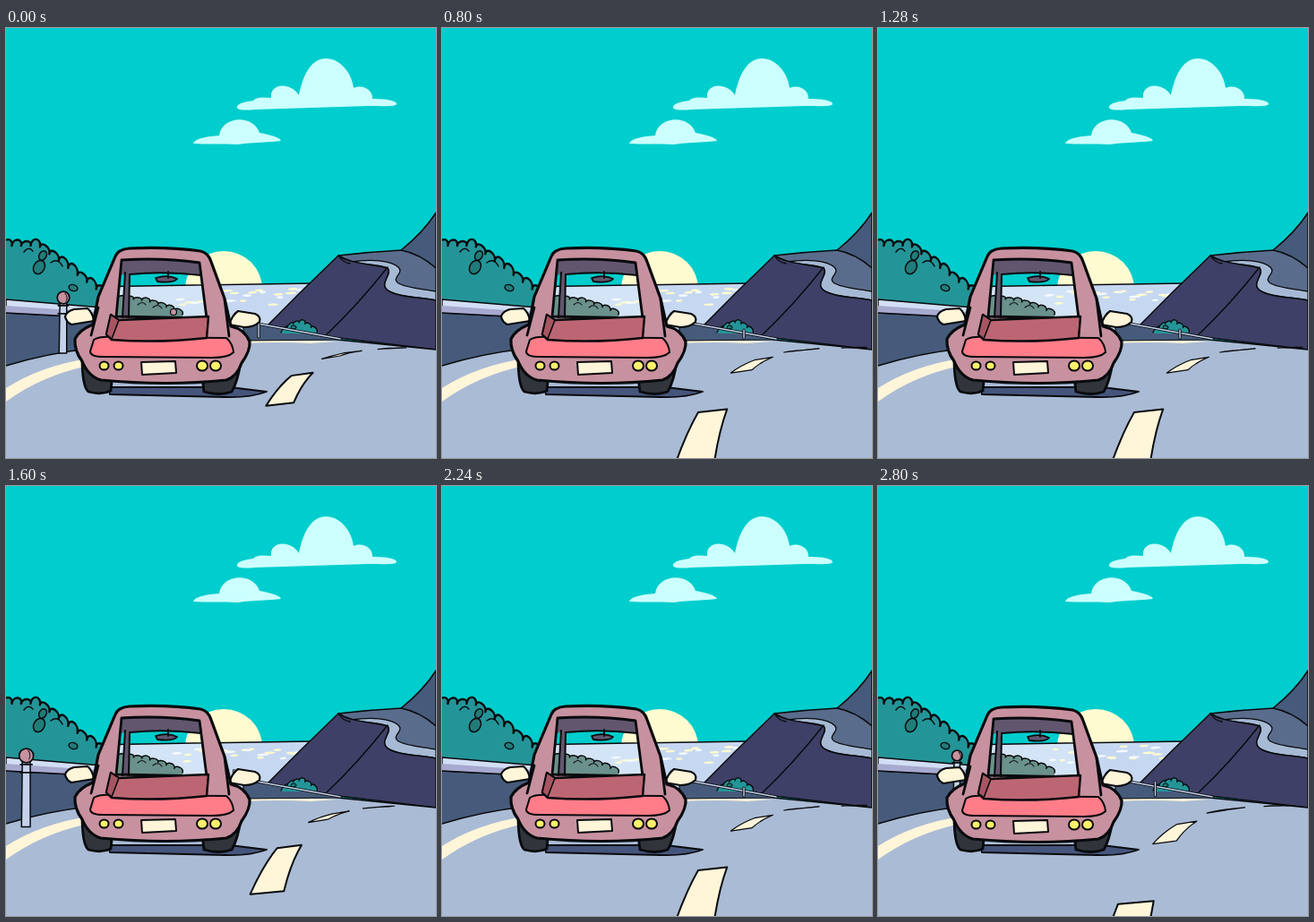
Animation of 480x480 px, one loop 2880 ms. Source, as an HTML page with a canvas:

```html
<!DOCTYPE html>
<html lang="en">
<head>
<meta charset="utf-8">
<title>Coast drive</title>
<style>
html, body { margin: 0; width: 100%; height: 100%; overflow: hidden; background: #00cdcd; }
canvas { display: block; width: 480px; height: 480px; }
</style>
</head>
<body>
<canvas id="stage" width="480" height="480"></canvas>
<script>
const ctx = document.getElementById('stage').getContext('2d');
const LOOP = 2880;
const SCENERY_STEP = 120;
const CAR_STEP = 80;

const INK = '#080a0d', CREAM = '#fff5d9', SUN = '#fffbd0', SEA = '#c6d8f1', GLASS_SEA = '#d3e4f6';
const ROAD = '#aabbd5', SLOPE = '#465b7b', ROCK = '#5a6c8b', DARK_ROCK = '#3f4067';
const LEAF = '#239598', DARK_LEAF = '#217c79', RAIL = '#c5d2eb', PINK = '#c8919f', TINT = '#62566f';

function shape(d, fill, width = 0, ink = INK) {
  const path = new Path2D(d);
  if (fill) {
    ctx.fillStyle = fill;
    ctx.fill(path);
  }
  if (width) {
    ctx.strokeStyle = ink;
    ctx.lineWidth = width;
    ctx.stroke(path);
  }
}

function oval(x, y, rx, ry, fill, width = 0, tilt = 0) {
  ctx.beginPath();
  ctx.ellipse(x, y, rx, ry, tilt, 0, Math.PI * 2);
  ctx.fillStyle = fill;
  ctx.fill();
  if (width) {
    ctx.strokeStyle = INK;
    ctx.lineWidth = width;
    ctx.stroke();
  }
}

function random(seed) {
  const v = Math.sin(seed * 127.1 + 11.7) * 43758.5453;
  return v - Math.floor(v);
}

// Row of leafy bumps whose valleys follow top(x).
function foliage(x0, x1, bumps, top, lift, base, fill, width) {
  const step = (x1 - x0) / bumps;
  let d = `M${x0} ${top(x0)}`;
  for (let i = 1; i <= bumps; i++) {
    const x = x0 + i * step, y = top(x), from = x - step;
    const rise = lift * (0.8 + 0.5 * random(i));
    d += `C${from + 1} ${top(from) - rise} ${x + 2} ${y - rise} ${x} ${y}`;
  }
  shape(`${d}V${base}H${x0}Z`, fill);
  shape(d, null, width);
}

function sky() {
  ctx.fillStyle = '#00cdcd';
  ctx.fillRect(0, 0, 480, 480);
  shape('M258 89C257 84 269 82 276 81C281 76 289 78 296 78C294 61 318 60 327 75' +
    'C331 54 340 34 357 34C373 34 386 50 388 67C400 62 410 71 409 79C420 79 436 80 436 85' +
    'C435 88 422 87 405 87L278 91C269 92 259 92 258 89Z', '#ccffff');
  shape('M209 129C211 123 225 121 238 120C241 98 276 96 283 117C294 119 306 122 307 126' +
    'C295 128 278 127 259 130C240 129 224 130 209 129Z', '#ccffff');
  oval(243, 291, 43, 42, SUN);
}

function sea(pattern, colour) {
  shape('M90 289L342 285L285 340H90Z', colour);
  shape('M90 289L342 285', null, 1.5);
  for (let i = 0; i < 22; i++) {
    const seed = pattern * 100 + i * 3;
    const x = 190 + (i + random(seed)) * 6.4;
    const y = 290 + 19 * random(seed + 1);
    oval(x, y, 3 + 4 * random(seed + 2), 1.3, i % 3 ? SUN : '#f4faff', 0, -0.04);
  }
}

function hills() {
  shape('M480 206Q466 228 441 248Q458 266 480 272Z', SLOPE, 1.5);
  shape('M371 254Q405 250 441 248Q462 252 480 268V320H425Z', ROCK, 1.5);
  shape('M385 261C407 258 429 259 438 267C445 274 429 279 438 285C450 291 464 291 480 294' +
    'V304C461 300 440 301 428 294C414 286 432 276 426 268C418 264 397 264 385 261Z', '#a6bad5', 1.3);
  shape('M371 254Q329 294 290 334L354 344L480 359V304C461 300 440 301 428 294' +
    'C414 286 432 276 426 268C407 263 387 264 371 254Z', DARK_ROCK, 1.5);
  shape('M371 254Q376 262 384 263M426 267Q392 310 357 343', null, 1.4);
}

function leftBank() {
  foliage(-4, 132, 13, x => 243 + 0.75 * Math.max(0, x - 36), 8, 314, LEAF, 2.4);
  shape('M20 250Q25 243 30 249M50 262Q58 256 63 266', null, 1.5);
  oval(41, 254, 4, 5.5, DARK_LEAF, 1.5, 0.5);
  oval(37, 267, 6, 8, DARK_LEAF, 1.5, 0.5);
  oval(75, 290, 5, 3.5, DARK_LEAF, 1.4, 0.3);

  shape('M0 317L130 323V365L0 379Z', SLOPE);
  shape('M0 303L130 314V325L0 318Z', '#d2def4', 1.5);
  shape('M0 310L130 319V325L0 318Z', '#a7a9d0');
  shape('M0 318L130 325', null, 1.5);
}

function road() {
  shape('M0 377Q46 363 93 358L271 349L370 348L480 359V480H0Z', ROAD);
  shape('M0 377Q46 363 93 358M370 348L480 359', null, 1.5);
  shape('M0 402Q39 377 92 369V377Q40 388 0 417Z', CREAM);
  shape('M266 349Q315 347 369 350L340 352Q302 350 266 352Z', CREAM);
}

function rightBank(turn) {
  shape('M265 328L292 332L372 348L265 349Z', SLOPE, 1.2);
  foliage(307, 347, 6, x => 340 - 11 * Math.sin((x - 307) / 40 * Math.PI), 4, 341, LEAF, 1.3);
  oval(321, 334, 3, 2, DARK_LEAF, 1);
  shape('M270 328L373 347', null, 3.2);
  shape('M270 328L373 347', null, 1.4, RAIL);
  const near = (turn + 2) % 4;
  const post = `M${337 - 27.5 * near} ${337 - 6.5 * near}v${9 + 6 * near}`;
  shape(post, null, 3.2);
  shape(post, null, 1.4, RAIL);
}

function leftPost(turn) {
  const scale = 1.7 ** ((turn + 1) % 4 - 1);
  const x = 123 - 59 * scale, y = 301, r = 6.8 * scale ** 0.3, w = r * 0.55;
  shape(`M${x - w} ${y}L${x - w - 1} ${338 + 25 * scale}H${x + w}V${y}Z`, RAIL, 1.5);
  for (const gap of [2, 11]) shape(`M${x - w - 2} ${y + r + gap}h${w * 2 + 4}`, null, 1.8);
  oval(x, y, r, r, PINK, 1.7);
  shape(`M${x + 2} ${y - r + 2}q4 5 1 ${r + 2}`, null, 1);
}

// Depth below the horizon grows geometrically as a mark approaches.
function roadPoint(step, side) {
  const depth = 13 * 1.53 ** step;
  const half = Math.min(9, 2 * depth) + 0.1 * depth;
  const x = 445 - 33.5 * Math.log(depth) + side * half;
  return `${x} ${356 + depth - side * Math.min(1.7, depth / 5)}`;
}

function laneMarks(turn) {
  const length = 1.75, pieces = 5;
  for (let step = (turn + 2) % 4 - 8; step < 6; step += 4) {
    const left = [], right = [];
    for (let i = 0; i <= pieces; i++) {
      const at = step + length * i / pieces;
      left.push(roadPoint(at, -1));
      right.unshift(roadPoint(at, 1));
    }
    shape(`M${[...left, ...right].join('L')}Z`, CREAM, step > 1 ? 2 : 1.2);
  }
}

function wheels() {
  shape('M114 401L250 401L291 406Q272 413 244 412L116 409Z', '#46557c', 1.8);
  shape('M85 368C85 386 87 402 92 406Q106 410 117 405L119 385Z', '#30343b', 2.8);
  shape('M219 390L221 406Q238 411 252 406Q259 394 262 372Z', '#30343b', 2.8);
}

function sideMirrors() {
  shape('M66 322Q68 316 76 314L91 313Q97 318 98 327L73 331Q67 328 66 322Z', CREAM, 2.2);
  shape('M249 331Q253 320 259 316L278 319Q285 322 283 328Q277 334 266 334Z', CREAM, 2.2);
}

function carBody() {
  sideMirrors();
  // The window opening is a hole, so the landscape shows through.
  const cabin = 'M122 255Q125 247 138 246Q181 244 217 249Q226 251 229 261L244 302L251 333' +
    'Q266 336 272 350Q273 360 263 374Q258 389 246 393Q180 400 106 393Q92 389 85 372' +
    'Q76 360 77 347Q82 337 97 331L103 300Z';
  const opening = 'M129 259Q174 256 216 262L224 324L123 322Z';
  ctx.fillStyle = PINK;
  ctx.fill(new Path2D(cabin + opening), 'evenodd');

  shape('M129 259Q174 256 216 262L218 276Q177 271 138 275L137 323H130L133 275L127 276Z', TINT);
  shape('M137 323L138 275Q177 271 218 276M130 323L133 273', null, 2);
  shape(cabin, null, 3.2);
  shape(opening, null, 2.8);
  shape('M181 272V279M167 279Q181 275 191 280Q187 285 169 283Z', TINT, 1.8);
  shape('M103 312L95 343M244 303L249 344', null, 2.8);

  shape('M98 348Q104 344 119 345L246 346Q253 352 254 362Q248 368 230 368L108 367' +
    'Q94 367 94 361Z', '#ff7d89', 2);
  shape('M117 320L126 326L226 322L224 346Q170 352 118 348L112 342Z', '#bd6673', 2.5);
  shape('M117 320L126 326L118 347L112 342Z', '#a85562', 1.6);

  for (const [centre, gap, r] of [[117.5, 8, 5], [226.5, 7.5, 6]]) {
    for (const side of [-1, 1]) oval(centre + side * gap, 377, r, r - 0.5, '#fff16b', 2);
  }
  shape('M151 373L189 372L190 385L152 387Z', CREAM, 2);
}

function windowView(turn, pattern) {
  ctx.save();
  ctx.clip(new Path2D('M129 259L216 262L224 325L123 323Z'));
  sky();
  sea(pattern, GLASS_SEA);
  foliage(124, 197, 8, x => 302 + 18 * ((x - 124) / 73) ** 2.2, 4, 323, '#6a918b', 1.5);
  shape('M147 309Q152 304 156 309M164 312Q170 307 174 313', null, 1.1);
  if (turn === 0) oval(187, 317, 3.5, 3.5, PINK, 1.2);
  ctx.restore();
}

function draw(time) {
  const tick = Math.floor(time / SCENERY_STEP);
  const turn = tick % 4, pattern = tick % 3;
  const bounce = Math.floor(time / CAR_STEP) % 2;
  sky();
  sea(pattern, SEA);
  hills();
  leftBank();
  road();
  rightBank(turn);
  leftPost(turn);
  laneMarks(turn);
  windowView(turn, pattern);
  wheels();
  ctx.save();
  ctx.translate(0, bounce);
  carBody();
  ctx.restore();
}

ctx.lineJoin = ctx.lineCap = 'round';
function frame() {
  draw(performance.now() % LOOP);
  requestAnimationFrame(frame);
}
draw(0);
requestAnimationFrame(frame);
</script>
</body>
</html>
```
